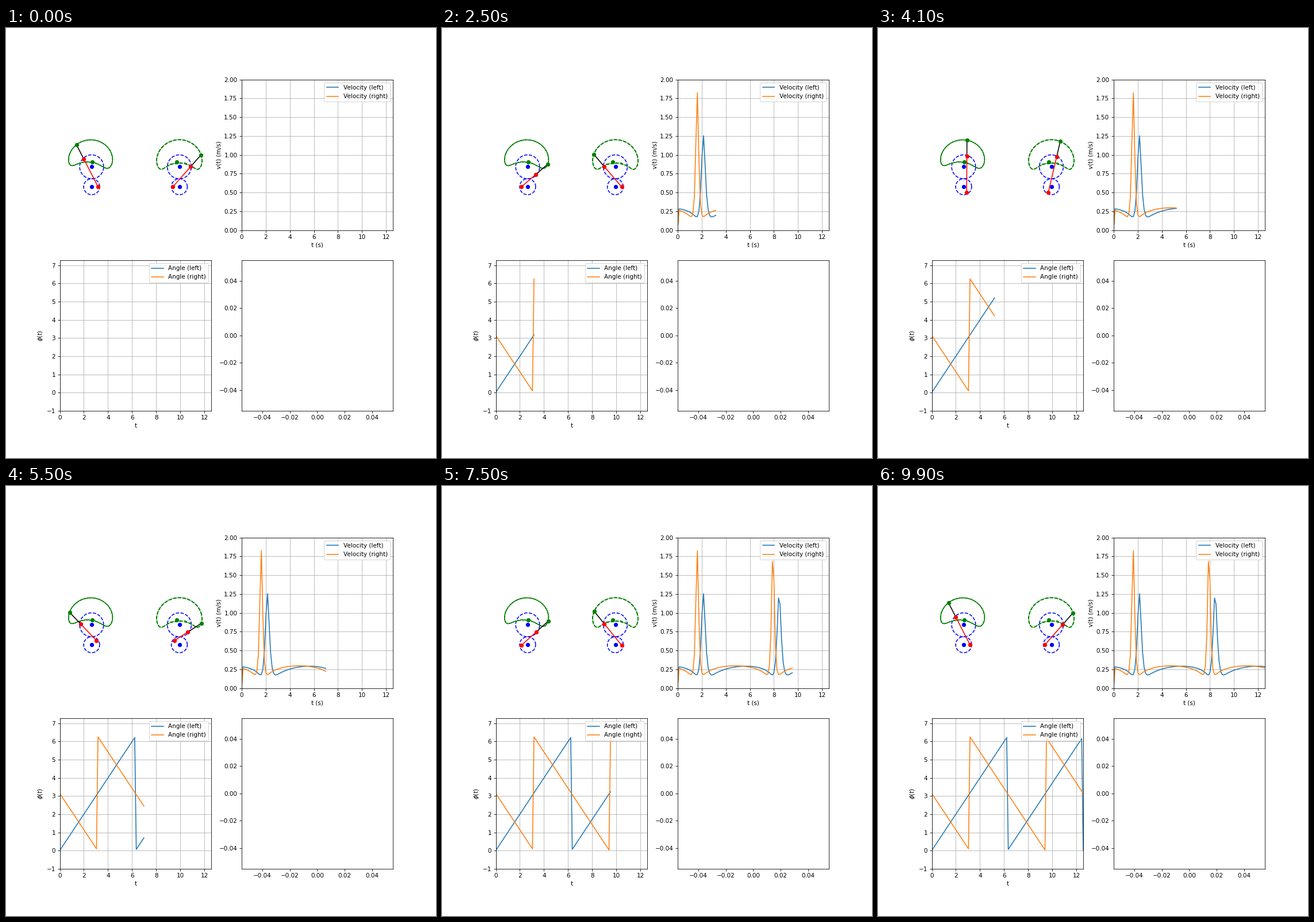
These frames come from a looping animation (748 px wide and 748 px high, 10000 ms). A matplotlib script:

```python
import numpy as np
import matplotlib.pyplot as plt
from matplotlib.animation import FuncAnimation

N = 100
STEP = 0.2                               # time unit of the speed estimate
R_LOW, R_UP, ARM, GAP = 0.16, 0.28, 0.4, 0.5
T = np.linspace(0, 4 * np.pi, N)


def linkage(x0, phi, lead):
    """Lower pin, upper pin and foot for crank angle phi."""
    low = np.array([x0 + R_LOW * np.cos(phi), R_LOW * np.sin(phi)])
    up = np.array([x0 + R_UP * np.cos(phi + lead),
                   GAP + R_UP * np.sin(phi + lead)])
    rod = up - low
    return low, up, up + ARM * rod / np.hypot(*rod)


def speed(foot):
    return np.r_[0, np.hypot(*np.diff(foot, axis=1)) / STEP]


fig, ((ax, ax_v), (ax_phi, ax_free)) = plt.subplots(
    2, 2, figsize=(10, 10), dpi=74.8)

ax.set_aspect("equal")
ax.set_xlim(-0.8, 3.0)
ax.set_ylim(-1.0, 2.6)
ax.axis("off")

ax_v.set(xlim=(0, T[-1]), ylim=(0, 2), xlabel="t (s)", ylabel="v(t) (m/s)")
ax_phi.set(xlim=(0, T[-1]), ylim=(-1, 2 * np.pi + 1),
           xlabel="t", ylabel=r"$\phi(t)$")
ax_v.grid()
ax_phi.grid()
ax_free.plot([], [])

# name, centre x, crank angle, lead of the upper pin, rest mark
SIDES = [("left", 0.0, T, 0.75 * np.pi, (0.01, 0.617)),
         ("right", 2.2, np.pi - T, np.pi, (2.137, 0.617))]
turn = np.linspace(0, 2 * np.pi, 100)

parts = []
for name, x0, phi, lead, rest in SIDES:
    low, up, foot = linkage(x0, phi, lead)
    for y, r in ((0, 0.2), (GAP, 0.3)):
        ax.plot(x0 + r * np.cos(turn), y + r * np.sin(turn), "b--")
        ax.plot(x0, y, "bo")
    ax.plot(*foot, "g--")
    ax.plot(*rest, "go")
    arm, = ax.plot([], [], "k-")
    rod, = ax.plot([], [], "ro-")
    tip, = ax.plot([], [], "go")
    v_line, = ax_v.plot([], [], label=f"Velocity ({name})")
    phi_line, = ax_phi.plot([], [], label=f"Angle ({name})")
    parts.append((low, up, foot, speed(foot), phi % (2 * np.pi),
                  arm, rod, tip, v_line, phi_line))

ax_v.legend(loc="best")
ax_phi.legend(loc="best")


def update(i):
    for low, up, foot, v, phi, arm, rod, tip, v_line, phi_line in parts:
        rod.set_data(*np.c_[low[:, i], up[:, i]])
        arm.set_data(*np.c_[up[:, i], foot[:, i]])
        tip.set_data(*foot[:, i:i + 1])
        v_line.set_data(T[:i + 1], v[:i + 1])
        phi_line.set_data(T[:i + 1], phi[:i + 1])


anim = FuncAnimation(fig, update, frames=N, interval=100,
                     repeat=True, repeat_delay=0, blit=False)
plt.show()
```
